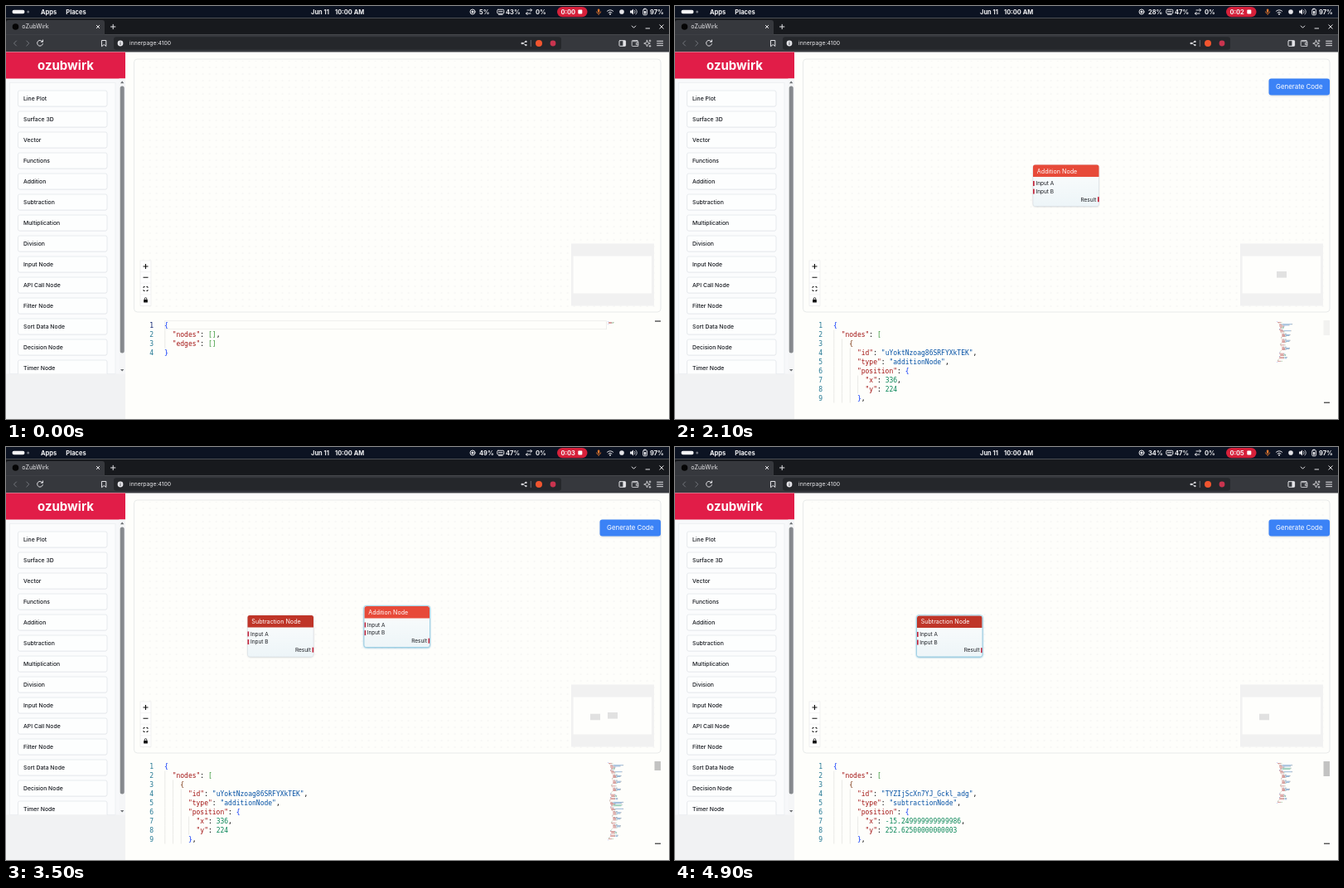
Recreate the animation shown at these times as an HTML page. Size 800 by 498 pixels, loop 5000 ms.

```html
<!DOCTYPE html>
<html lang="en">
<head>
<meta charset="utf-8">
<title>Node editor</title>
<style>
  html, body { margin: 0; width: 100%; height: 100%; overflow: hidden; background: #fefefb; }
  svg { display: block; width: 100vw; height: 100vh; }
  text { font-family: Inter, sans-serif; white-space: pre; }
  .bar { font-size: 7.5px; font-weight: 700; fill: #f4f4f6; }
  .ui { font-size: 6.8px; fill: #e6e6e9; }
  .item { font-size: 6.85px; font-weight: 500; fill: #15181e; }
  .code { font: 8px "DejaVu Sans Mono", monospace; }
  .line { fill: none; stroke: #e4e4e8; stroke-width: 1; stroke-linecap: round; stroke-linejoin: round; }
  .thin { stroke-width: .8; }
</style>
</head>
<body>
<svg viewBox="0 0 800 498">
  <defs>
    <pattern id="dots" width="8" height="8" x="1.6" y="5.9" patternUnits="userSpaceOnUse">
      <circle cx="4" cy="4" r=".4" fill="#9a9aa2" opacity=".6"/>
    </pattern>
    <linearGradient id="body" x2="0" y2="1">
      <stop stop-color="#fcfdfd"/><stop offset="1" stop-color="#edf5f8"/>
    </linearGradient>
    <filter id="soft" x="-20%" y="-20%" width="140%" height="150%"><feGaussianBlur stdDeviation="1.1"/></filter>
    <clipPath id="list"><rect y="87.5" width="144" height="356"/></clipPath>
    <clipPath id="editor"><rect x="150" y="376" width="650" height="104"/></clipPath>
  </defs>
  <rect width="800" height="498" fill="#fefefb"/>

  <!-- system bar -->
  <rect width="800" height="14.5" fill="#0c1322"/>
  <rect x="7.5" y="4.8" width="15" height="4.4" rx="2.2" fill="#f4f4f6"/>
  <circle cx="26.7" cy="7" r="1.5" fill="#6d727d"/>
  <g class="bar">
    <text x="42" y="9.7">Apps</text><text x="72.3" y="9.7">Places</text>
    <text x="368" y="9.7">Jun 11</text><text x="432.3" y="9.7" text-anchor="end">10:00 AM</text>
    <text id="cpu" x="571" y="9.7"></text><text id="mem" x="603" y="9.7"></text>
    <text x="639" y="9.7">0%</text><text x="777" y="9.7">97%</text>
  </g>
  <circle class="line" cx="563" cy="7" r="3"/><circle cx="563" cy="7" r="1.6" fill="#e4e4e8"/>
  <rect class="line" x="592.8" y="4.3" width="8" height="4.8" rx="1"/>
  <path class="line" d="M594.5 6.6h4.6M594.5 10.3h4.6"/>
  <path class="line" d="M629 5h5.5m-1.6-1.6l1.6 1.6-1.6 1.6M633 9h-5.5m1.6-1.6l-1.6 1.6 1.6 1.6"/>
  <rect x="665" y="1" width="36.5" height="12.2" rx="6.1" fill="#d7203a"/>
  <text id="clock" class="bar" x="669.5" y="9.7"></text>
  <rect x="690.3" y="4.5" width="5" height="5" rx="1" fill="#fff"/>
  <g stroke="#e8782e" fill="none">
    <rect x="713.9" y="3.4" width="2.4" height="4.4" rx="1.2" fill="#e8782e" stroke="none"/>
    <path d="M712.5 6.5a2.6 2.6 0 0 0 5.2 0M715.1 9.2v1.8" stroke-width=".8"/>
  </g>
  <path class="line" d="M725.4 6.2a5 5 0 0 1 7.2 0M727 8a3 3 0 0 1 4 0"/><circle cx="729" cy="9.7" r="1" fill="#e4e4e8"/>
  <circle cx="743" cy="7" r="2.8" fill="#e4e4e8"/>
  <path d="M753 5.6h1.8l2.2-2v6.8l-2.2-2H753z" fill="#e4e4e8"/><path class="line thin" d="M758.5 5.3a2.6 2.6 0 0 1 0 3.4M760 4a4.4 4.4 0 0 1 0 6"/>
  <rect class="line" x="768.8" y="3.8" width="4.6" height="7" rx="1"/><path d="M770 2.8h2.2v1H770zM770 6h2.2v3.6H770z" fill="#e4e4e8"/>

  <!-- browser -->
  <rect y="14.5" width="800" height="20" fill="#17191d"/>
  <path d="M0 34.5V20q0-3 3-3H116q3 0 3 3V34.5z" fill="#36383d"/>
  <rect y="34.2" width="800" height="21.3" fill="#36383d"/>
  <circle cx="11.5" cy="25" r="3.8" fill="#050505"/>
  <text class="ui" x="19.3" y="27.4" style="font-size:7.1px">oZubWirk</text>
  <path class="line" d="M109.3 23.3l3.4 3.4m0-3.4l-3.4 3.4M126.5 25h5.4m-2.7-2.7v5.4"/>
  <path class="line" d="M755.2 24l2.3 2.3 2.3-2.3M772 27h4.6M788.8 22.8l4.4 4.4m0-4.4l-4.4 4.4"/>
  <rect x="130" y="37.3" width="540" height="15.4" rx="3" fill="#25272b"/>
  <path class="line" d="M12.5 42l-3 3 3 3M24.8 42l3 3-3 3" style="stroke:#73767c"/>
  <path class="line" d="M44 43a3.4 3.4 0 1 0 .4 2.6M44.5 41v2.2h-2.2"/>
  <path class="line" d="M115.8 41.5h5v7l-2.5-2-2.5 2z"/>
  <circle cx="138" cy="45" r="3.4" fill="#e4e4e8"/><path d="M138 44.6v2.2M138 43v.7" stroke="#25272b" stroke-width=".9"/>
  <text class="ui" x="149" y="47.4">innerpage:4100</text>
  <path class="line thin" d="M623.5 45l3.6-2m-3.6 2l3.6 2"/>
  <g fill="#d4d4d8"><circle cx="622.8" cy="45" r="1.3"/><circle cx="627.4" cy="42.9" r="1.2"/><circle cx="627.4" cy="47.1" r="1.2"/></g>
  <path d="M633.3 41v8" stroke="#7a7c82" stroke-width=".8"/>
  <circle cx="643" cy="45" r="4" fill="#f0552f"/><circle cx="660" cy="45" r="3.4" fill="#c9344f"/>
  <rect class="line" x="740" y="41.7" width="7.6" height="6.6" rx=".8"/><path d="M744.4 41.7h3.2v6.6h-3.2z" fill="#e4e4e8"/>
  <path class="line thin" d="M762 42.7v-1.2h-5.8q-1 0-1 1v5q0 1 1 1h6.6v-5.8h-6.6M762.8 44.6h-2.4v2h2.4"/>
  <path class="line thin" d="M773.5 41.3l1 2.8 2.8 1-2.8 1-1 2.8-1-2.8-2.8-1 2.8-1zM777 41v2m-1-1h2M777 47.3v2m-1-1h2"/>
  <path class="line" d="M785.6 42.3h7M785.6 45h7M785.6 47.7h7"/>

  <!-- sidebar -->
  <rect y="55.5" width="144" height="443" fill="#f1f2f3"/>
  <rect y="87.5" width="144" height="356" fill="#f7f8fa"/>
  <rect x="4.5" y="92.5" width="127.5" height="351" fill="#fbfcfd" stroke="#eceef1" stroke-width=".8"/>
  <rect y="55.5" width="144" height="32" fill="#e11d48"/>
  <text x="72" y="77" text-anchor="middle" fill="#fff" font-size="15" font-weight="700">ozubwirk</text>
  <g id="items" clip-path="url(#list)"></g>
  <rect x="136.5" y="87.5" width="7.5" height="356" fill="#f5f6f7"/>
  <rect x="137.7" y="96.5" width="5" height="322" rx="2.5" fill="#86898d"/>
  <path d="M138 93.2l2.2-2.6 2.2 2.6zM138 437.9l2.2 2.6 2.2-2.6z" fill="#6c6f73"/>

  <!-- flow canvas -->
  <rect x="154.5" y="64" width="635.5" height="305" rx="4" fill="#fefefb" stroke="#e6e8e8" stroke-width=".9"/>
  <rect x="162" y="66" width="626" height="302" fill="url(#dots)"/>
  <g id="nodes"></g>
  <rect x="162" y="307" width="13" height="54.5" fill="#fefefe" stroke="#ececec" stroke-width=".7"/>
  <path d="M162 320.6h13M162 334.2h13M162 347.8h13" stroke="#eee" stroke-width=".6"/>
  <path d="M165.5 314h6m-3-3v6M165.5 327.3h6" stroke="#111" stroke-width="1.1"/>
  <path d="M166 340v-1.5h1.6M169.4 338.5h1.6v1.5M171 342v1.5h-1.6M167.6 343.5H166V342" fill="none" stroke="#111" stroke-width=".9"/>
  <rect x="166.1" y="354" width="4.8" height="3.6" rx=".6" fill="#111"/><path d="M167.2 354v-1a1.3 1.3 0 0 1 2.6 0v1" fill="none" stroke="#111" stroke-width=".8"/>
  <rect x="682" y="286.5" width="100" height="75" fill="#f1f1f1"/><rect x="684.5" y="301.5" width="94.5" height="45" fill="#fefefc"/>
  <g id="mini"></g>
  <g id="button">
    <rect x="716.8" y="88.4" width="73" height="20" rx="3" fill="#4a5a78" opacity=".22" filter="url(#soft)"/>
    <rect x="716.5" y="87.5" width="73.5" height="20" rx="3" fill="#3b82f6"/>
    <text x="753.3" y="100.4" text-anchor="middle" font-size="7.9" fill="#fff">Generate Code</text>
  </g>

  <!-- code editor -->
  <g clip-path="url(#editor)">
    <g id="code"></g>
    <rect id="thumb" x="782.5" y="379" width="7.5" fill="#c3c3c2"/>
    <rect id="mark" x="783" width="7" height="1.3" fill="#454545"/>
  </g>
</svg>

<script>
const LOOP = 5000, COL = 4.816, ROW = 11;
const $ = id => document.getElementById(id);

// value tables: [from ms, value]
const cpu = [[0, '5%'], [200, '16%'], [1200, '28%'], [2200, '47%'], [3300, '49%'], [4200, '34%']];
const mem = [[0, '43%'], [200, '45%'], [1200, '47%']];
const clock = [[0, 0], [800, 1], [1800, 2], [2800, 3], [3800, 4], [4800, 5]];
const shown = [[0, ''], [1000, 'a'], [2400, 'as'], [4000, 's']];
const picked = [[0, ''], [3200, 'a'], [4000, ''], [4400, 's']];
const edits = [1000, 2400, 3200, 4400];

const kinds = {
  a: { name: 'Addition', id: 'uYoktNzoag86SRFYXkTEK', x: 336, y: 224, color: '#e74a39' },
  s: { name: 'Subtraction', id: 'TYZIjScXn7YJ_Gckl_adg', x: -15.249999999999986, y: 252.62500000000003, color: '#bf3528' }
};

const at = (table, t) => table.filter(s => s[0] <= t).pop()[1];
const clamp = v => Math.max(0, Math.min(1, v));
const rect = (x, y, w, h, fill, more = '') =>
  `<rect x="${x}" y="${y}" width="${w}" height="${h}" fill="${fill}" ${more}/>`;
const esc = s => s.replace(/&/g, '&amp;').replace(/</g, '&lt;');

const labels = ['Line Plot', 'Surface 3D', 'Vector', 'Functions', 'Addition', 'Subtraction', 'Multiplication',
  'Division', 'Input Node', 'API Call Node', 'Filter Node', 'Sort Data Node', 'Decision Node', 'Timer Node'];
$('items').innerHTML = labels.map((s, i) => {
  const y = 102 + i * 25;
  return rect(14.5, y + .6, 107.5, 19, '#eaecef', 'rx="2"') +
    rect(14.5, y, 107.5, 19, '#fdfefe', 'rx="2" stroke="#e3e6ea" stroke-width=".8"') +
    `<text class="item" x="21" y="${y + 12}">${s}</text>`;
}).join('');

const port = (x, y) => rect(x, y, 1.7, 6, '#c4263c');
const small = (x, y, s, more = '') => `<text x="${x}" y="${y}" font-size="6.5" fill="#1b1d22" ${more}>${s}</text>`;

function nodeMarkup(key) {
  const k = kinds[key];
  return `<g id="node-${key}" transform="translate(${297.6 + k.x * .4} ${101.9 + k.y * .4})">
    ${rect(.3, 1, 79, 49.6, '#59636e', 'rx="3" opacity=".3" filter="url(#soft)"')}
    <g class="glow" opacity="0">${rect(-.3, .2, 80, 50.6, '#3aa7dc', 'rx="3" filter="url(#soft)"')}</g>
    ${rect(0, 0, 79.5, 50, 'url(#body)', 'rx="2.5" stroke="#d5dbe0" stroke-width=".5"')}
    <g class="inner">
      <path d="M0 14.5V2.5Q0 0 2.5 0H77Q79.5 0 79.5 2.5V14.5z" fill="${k.color}"/>
      <text x="4.8" y="10" font-size="7.2" fill="#fff">${k.name} Node</text>
      ${small(3.4, 24.8, 'Input A')}${small(3.4, 34.4, 'Input B')}
      ${small(76.4, 44, 'Result', 'text-anchor="end"')}
      ${port(0, 19.5)}${port(0, 29.1)}${port(78, 38.7)}
    </g>
    <rect class="edge" width="79.5" height="50" rx="2.5" fill="none" stroke-width=".5"/>
  </g>`;
}
$('nodes').innerHTML = nodeMarkup('a') + nodeMarkup('s');

function drawNode(key, visible, since) {
  const g = $('node-' + key), on = since >= 0, p = on ? clamp(since / 300) : 0;
  g.style.display = visible ? '' : 'none';
  g.querySelector('.glow').setAttribute('opacity', p * .6);
  g.querySelector('.inner').setAttribute('transform', on ? 'translate(.5 .5) scale(.988 1)' : '');
  const mix = (a, b) => Math.round(a + (b - a) * p);
  g.querySelector('.edge').setAttribute('stroke', on ? `rgb(${mix(185, 110)},${mix(190, 195)},${mix(196, 226)})` : 'none');
}

const slot = (id, label) => ({ id, label, type: 'number', value: 0 });
function source(keys, sel) {
  const nodes = [...keys].map(key => {
    const { name, id, x, y } = kinds[key];
    return {
      id, type: name.toLowerCase() + 'Node', position: { x, y },
      data: { label: name + ' Node', inputs: [slot('a', 'Input A'), slot('b', 'Input B')], outputs: [slot('r', 'Result')] },
      measured: { width: 200, height: 125 }, selected: key === sel, dragging: false
    };
  });
  return JSON.stringify({ nodes, edges: [] }, null, 2).split('\n');
}

const brackets = ['#0431fa', '#319331', '#7b3814'];
function tokens(lines, plain) {
  let depth = 0;
  return lines.map(line => [...line.matchAll(/"[^"]*"|[[\]{}]|-?[\d.]+|true|false|[:,]|\s+/g)].map(m => {
    const s = m[0];
    let fill = '#000';
    if ('[{'.includes(s)) fill = brackets[depth++ % 3];
    else if (']}'.includes(s)) fill = brackets[--depth % 3];
    else if (plain) fill = '#000';
    else if (s[0] === '"') fill = line[m.index + s.length] === ':' ? '#a31515' : '#0451a5';
    else if (/^[-\d]/.test(s)) fill = '#098658';
    else if (/^[tf]/.test(s)) fill = '#0451a5';
    return { s, fill, col: m.index };
  }));
}

function codeMarkup(keys, sel, plain) {
  const lines = source(keys, sel), toks = tokens(lines, plain);
  let out = keys ? '' : rect(191.5, 379.7, 533, 10, 'none', 'stroke="#ededeb" stroke-width=".9"');
  lines.slice(0, 9).forEach((line, i) => {
    const base = 388 + i * ROW;
    for (let c = 0; c < line.search(/\S/); c += 2)
      out += rect(191.6 + c * COL, base - 8.5, .6, ROW, '#dcdcda');
    out += `<text class="code" x="178" y="${base}" text-anchor="end" fill="${!keys && !i ? '#0b216f' : '#237893'}">${i + 1}</text>`;
    out += `<text class="code" x="191" y="${base}">` +
      toks[i].map(k => `<tspan fill="${k.fill}">${esc(k.s)}</tspan>`).join('') + '</text>';
  });
  toks.forEach((row, i) => row.forEach(k => {
    if (k.s.trim()) out += rect(726 + k.col * .53, 380 + i * 1.14, k.s.length * .53, .75, k.fill, 'opacity=".55"');
  }));
  return out;
}

let last = '';
function render(t) {
  const keys = at(shown, t), sel = at(picked, t);
  const plain = edits.some(e => t >= e && t < e + 100);
  $('cpu').textContent = at(cpu, t);
  $('mem').textContent = at(mem, t);
  $('clock').textContent = '0:0' + at(clock, t);
  drawNode('a', keys.includes('a'), sel === 'a' ? t - 3200 : -1);
  drawNode('s', keys.includes('s'), sel === 's' ? t - 4400 : -1);
  $('thumb').setAttribute('opacity', t < 2400 ? 1 - clamp((t - 1700) / 500) : 1);

  const state = [keys, sel, plain].join('|');
  if (state === last) return;
  last = state;
  $('code').innerHTML = codeMarkup(keys, sel, plain);
  $('button').style.display = keys ? '' : 'none';
  $('thumb').setAttribute('height', [0, 18, 11][keys.length]);
  $('mark').setAttribute('y', keys ? 477.6 : 379.4);
  $('mini').innerHTML = [...keys].map(k =>
    rect(726 + (kinds[k].x - 336) * .0598, 320 + (kinds[k].y - 224) * .0598, 12, 7.6, '#e1e1e1')).join('');
}

const start = performance.now();
function tick() {
  render((performance.now() - start) % LOOP);
  requestAnimationFrame(tick);
}
tick();
</script>
</body>
</html>
```
